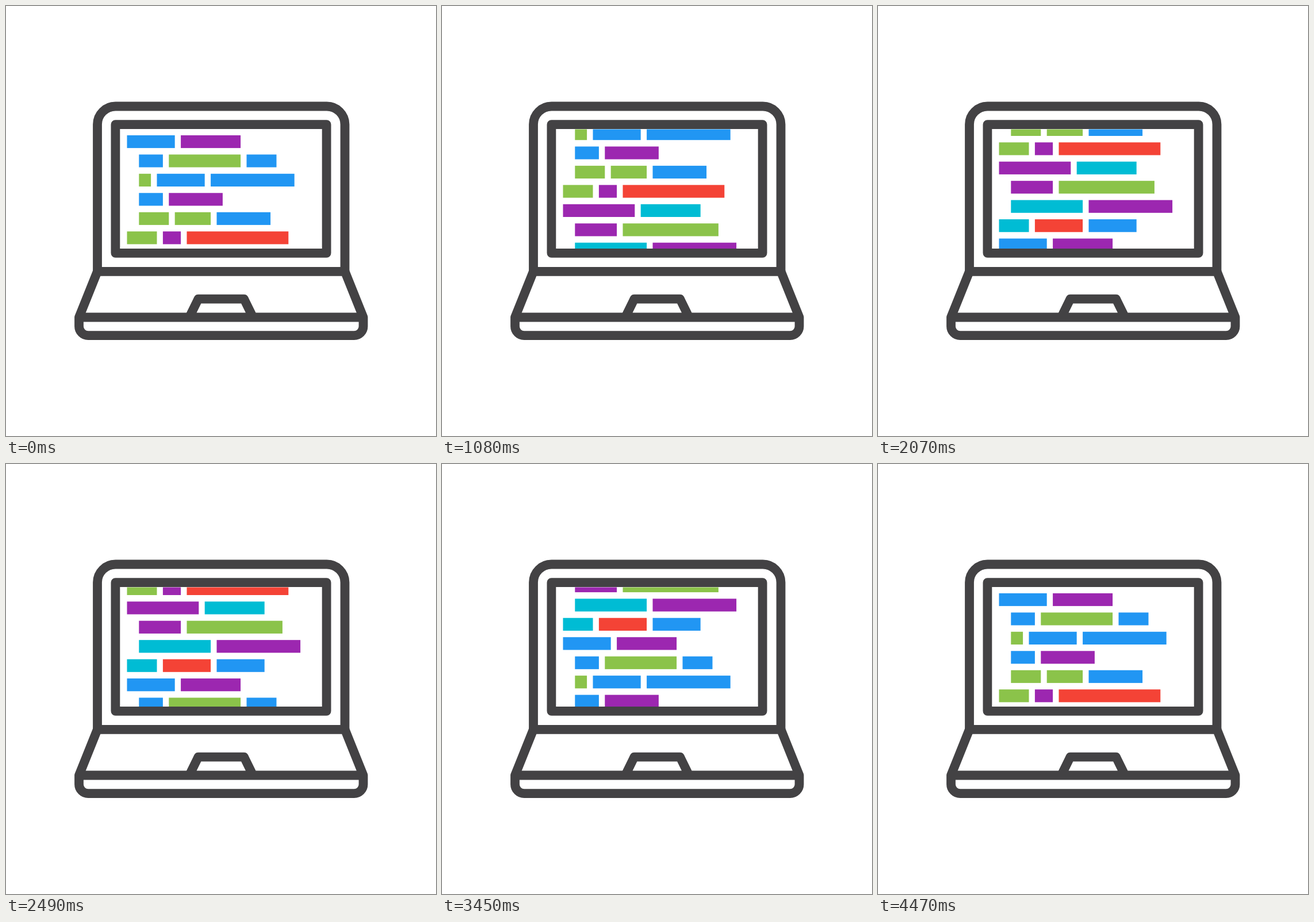
An HTML page for the animation above (4500 ms loop, 748 by 748 pixels).

```html
<!DOCTYPE html>
<html lang="en">
<head>
<meta charset="utf-8">
<title>Scrolling code on a laptop</title>
<style>
  html, body { margin: 0; height: 100%; overflow: hidden; background: #fff; }
  svg { display: block; width: 100vw; height: 100vh; }
</style>
</head>
<body>
<svg viewBox="0 0 748 748">
  <clipPath id="screen"><rect x="198" y="214.5" width="352" height="207.5"/></clipPath>
  <g clip-path="url(#screen)"><g id="code"></g></g>
  <g fill="none" stroke="#434244" stroke-width="15.8" stroke-linejoin="round">
    <path d="M159 461.8V206a31.5 31.5 0 0 1 31.5-31.5H558a31.5 31.5 0 0 1 31.5 31.5V461.8"/>
    <rect x="190.4" y="206.2" width="367.2" height="223.6"/>
    <path d="M159 461.8H589.5L621.5 541.5V557.2a16 16 0 0 1-16 16H143a16 16 0 0 1-16-16V541.5Z"/>
    <path d="M127 541.5H621.5M319.1 541L334.5 509.6H414L429.4 541"/>
  </g>
</svg>
<script>
const COLORS = { b: '#2196f3', p: '#9c27b0', g: '#8bc34a', r: '#f44336', c: '#00bcd4' };
// Each line: indent, then colour + length of every block, in character units.
const LINES = [
  '0 b8 p10', '2 b4 g12 b5', '2 g2 b8 b14', '2 b4 p9', '2 g5 g6 b9',
  '0 g5 p3 r17', '0 p12 c10', '2 p7 g16', '2 c12 p14', '0 c5 r8 b8'
];
const UNIT = 10.4, PITCH = 33.45, LEFT = 210.5, TOP = 224.9, BAR = 22.2;
const LOOP = 4500, STEP = 30, LAST = LOOP / STEP - 1;
const code = document.getElementById('code');

function addLine(line, row) {
  const [indent, ...blocks] = line.split(' ');
  let column = +indent;
  for (const block of blocks) {
    const length = +block.slice(1);
    const rect = document.createElementNS(code.namespaceURI, 'rect');
    const attrs = {
      x: LEFT + column * UNIT, y: TOP + row * PITCH,
      width: length * UNIT, height: BAR, fill: COLORS[block[0]]
    };
    for (const name in attrs) rect.setAttribute(name, attrs[name]);
    code.append(rect);
    column += length + 1;
  }
}

function draw() {
  const step = Math.floor(performance.now() % LOOP / STEP);
  const scroll = step / LAST * LINES.length * PITCH;
  code.setAttribute('transform', `translate(0 ${-scroll})`);
  requestAnimationFrame(draw);
}

// The first screenful is repeated below so the loop has no seam.
[...LINES, ...LINES.slice(0, 7)].forEach(addLine);
draw();
</script>
</body>
</html>
```
